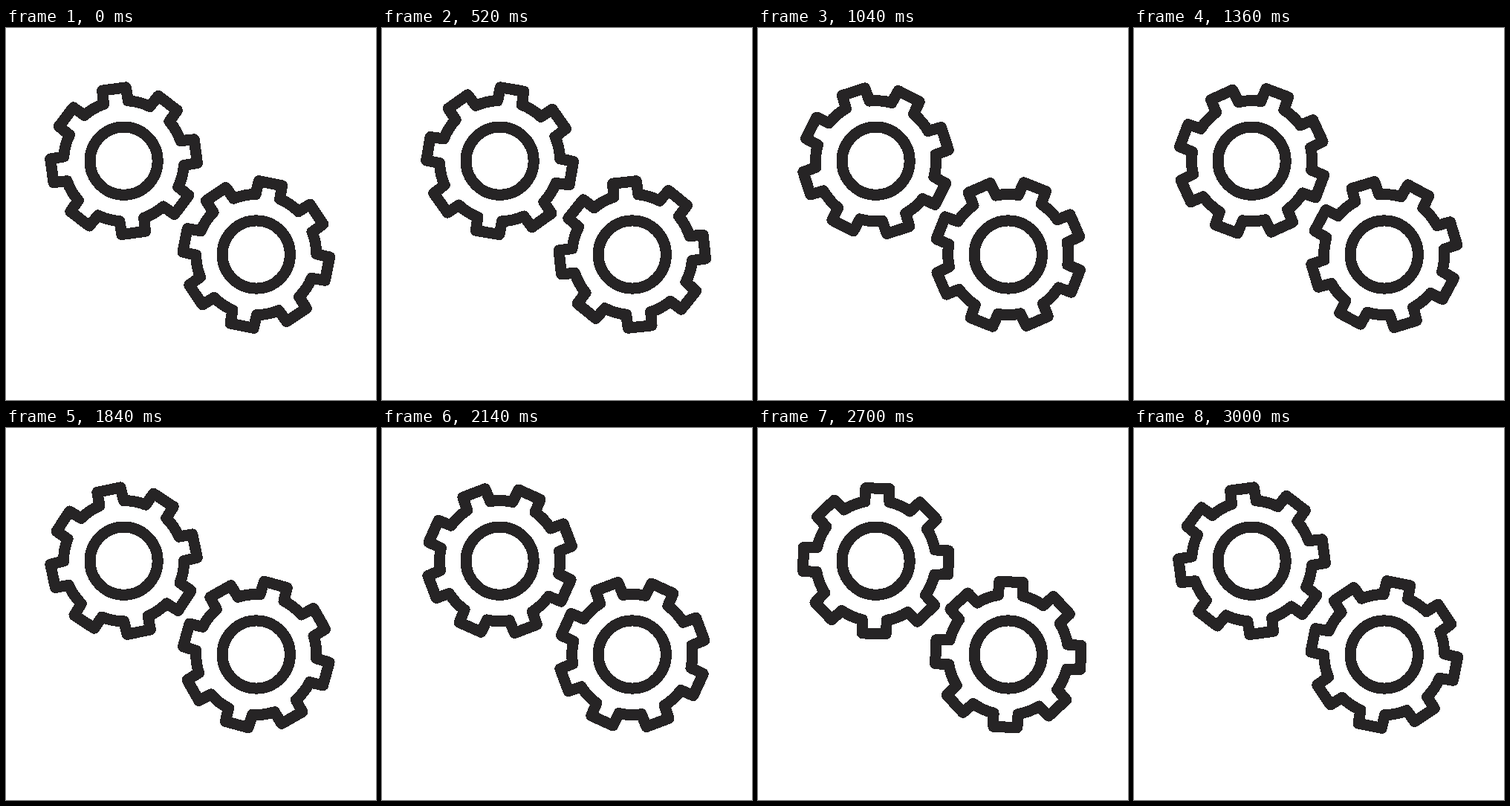
Recreate the animation shown at these times as an HTML page. Size 498 px wide and 500 px high, loop 3.02 s.

```html
<!DOCTYPE html>
<html lang="en">
<head>
<meta charset="utf-8">
<title>Gears</title>
<style>
  html, body { margin: 0; width: 100%; height: 100%; overflow: hidden; background: #fff; }
  svg { display: block; width: 498px; height: 500px; }
</style>
</head>
<body>
<svg viewBox="0 0 498 500" fill="none" stroke="#262425" stroke-width="15" stroke-linejoin="round" stroke-linecap="round" shape-rendering="crispEdges"></svg>
<script>
const LOOP = 3020, STEP = 20, DEG_PER_STEP = 2.4;
const TEETH = 8, PITCH = 360 / TEETH;
const TIP = { r: 98.9, half: 9.3 };    // tooth corner: radius, half angle
const ROOT = { r: 81.1, half: 11.8 };  // foot of the tooth
const HUB = 45.6;

const gears = [
  { x: 158.6, y: 178.7, start: -7.7, dir: 1 },
  { x: 336.8, y: 304.5, start: 11.3, dir: -1 }
];

const svg = document.querySelector('svg');

function add(parent, tag, attrs) {
  const el = document.createElementNS('http://www.w3.org/2000/svg', tag);
  for (const key in attrs) el.setAttribute(key, attrs[key]);
  return parent.appendChild(el);
}

// Point at a clockwise angle from straight up
function polar(r, deg) {
  const a = deg * Math.PI / 180;
  return `${(r * Math.sin(a)).toFixed(2)} ${(-r * Math.cos(a)).toFixed(2)}`;
}

function gearPath() {
  let d = '';
  for (let i = 0; i < TEETH; i++) {
    const mid = i * PITCH;
    const foot = polar(ROOT.r, mid - ROOT.half);
    d += i ? `A${ROOT.r} ${ROOT.r} 0 0 1 ${foot}` : `M${foot}`;
    d += `L${polar(TIP.r, mid - TIP.half)}L${polar(TIP.r, mid + TIP.half)}`;
    d += `L${polar(ROOT.r, mid + ROOT.half)}`;
  }
  return `${d}A${ROOT.r} ${ROOT.r} 0 0 1 ${polar(ROOT.r, -ROOT.half)}Z`;
}

for (const gear of gears) {
  const group = add(svg, 'g', { transform: `translate(${gear.x} ${gear.y})` });
  gear.rim = add(group, 'path', { d: gearPath() });
  add(group, 'circle', { r: HUB });
}

function draw(time) {
  const turn = Math.floor((time % LOOP) / STEP) * DEG_PER_STEP;
  for (const { rim, start, dir } of gears) {
    rim.setAttribute('transform', `rotate(${start + dir * turn})`);
  }
}

let origin;
function tick(now) {
  origin ??= now;
  draw(now - origin);
  requestAnimationFrame(tick);
}
draw(0);
requestAnimationFrame(tick);
</script>
</body>
</html>
```
